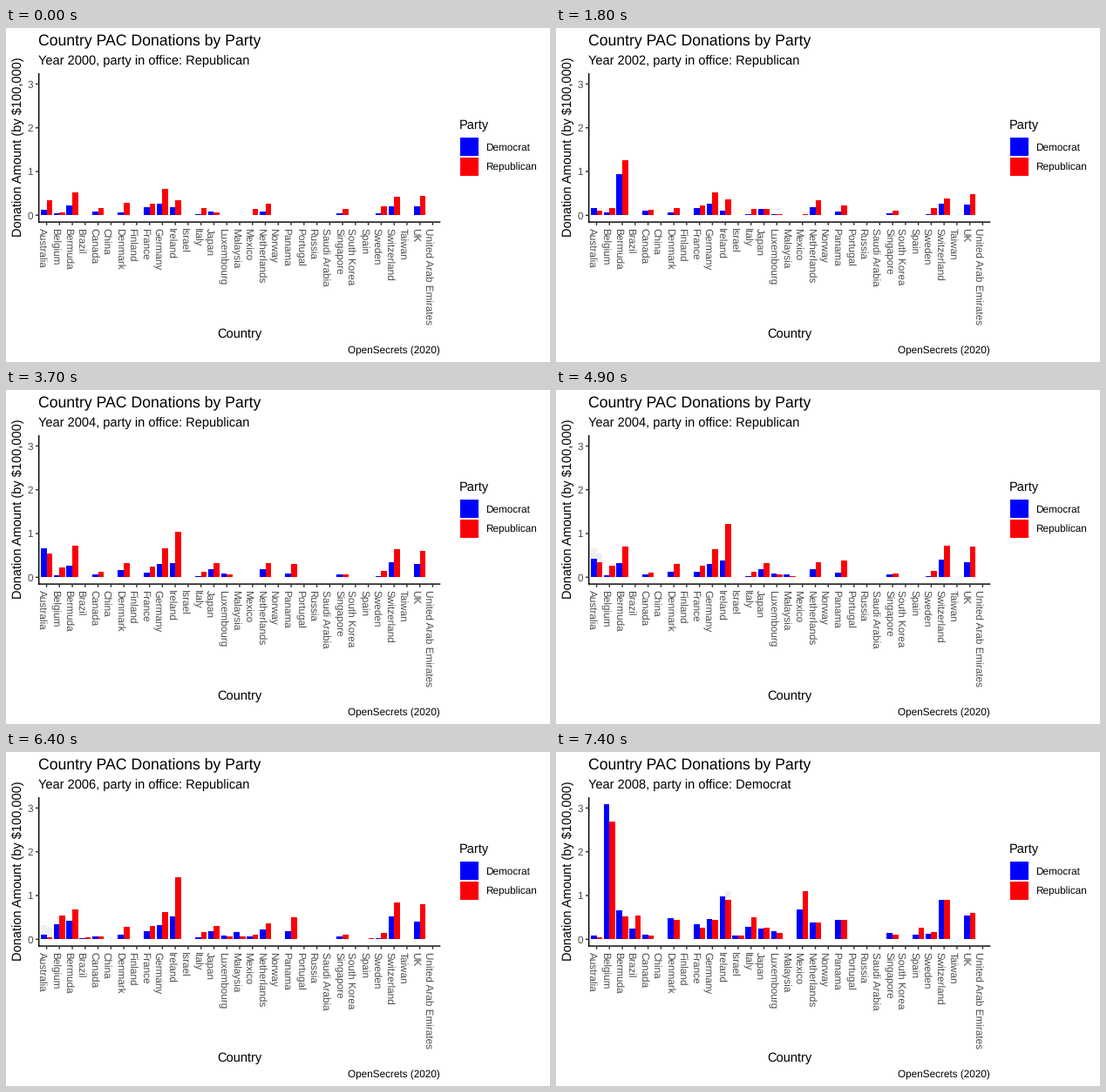
Animation, 624 px wide and 384 px high, one loop 8 s. Source, as a matplotlib script:

```python
import numpy as np
import matplotlib.pyplot as plt
from matplotlib.animation import FuncAnimation
from matplotlib.patches import Rectangle

plt.rcParams["font.family"] = "Liberation Sans"
plt.rcParams["text.hinting"] = "none"

WIDTH, HEIGHT, DPI = 624, 384, 96
LEFT, RIGHT, TOP, BOTTOM = 37.7, 498.3, 52.0, 223.1
ZERO, UNIT = 215.3, 50.3
STEP = (RIGHT - LEFT) / 31.2
BAR = 0.45 * STEP
BLUE, RED, WAKE = "#0000ff", "#fc0008", "#efefef"

COUNTRIES = (
    "Australia,Belgium,Bermuda,Brazil,Canada,China,Denmark,Finland,France,"
    "Germany,Ireland,Israel,Italy,Japan,Luxembourg,Malaysia,Mexico,Netherlands,"
    "Norway,Panama,Portugal,Russia,Saudi Arabia,Singapore,South Korea,Spain,"
    "Sweden,Switzerland,Taiwan,UK,United Arab Emirates").split(",")

# Donations for 2000, 2002, 2004, 2006 and 2008; countries left out gave nothing.
DEMOCRAT = {
    "Australia": (.13, .17, .66, .10, .08), "Belgium": (.05, .06, .05, .06, 3.09),
    "Bermuda": (.23, .94, .27, .39, .66), "Brazil": (0, 0, 0, 0, .24),
    "Canada": (.09, .11, .06, .07, .10), "Denmark": (.07, .07, .17, .07, .48),
    "France": (.18, .16, .11, .16, .34), "Germany": (.27, .27, .31, .30, .46),
    "Ireland": (.18, .11, .33, .48, .98), "Israel": (0, 0, 0, 0, .08),
    "Italy": (.02, .02, .02, .02, .28), "Japan": (.09, .15, .18, .18, .24),
    "Luxembourg": (0, .03, .09, .07, .19), "Malaysia": (0, 0, 0, .18, 0),
    "Mexico": (.01, 0, 0, 0, .68), "Netherlands": (.08, .18, .18, .20, .38),
    "Panama": (0, .08, .08, .15, .44), "Singapore": (.05, .05, .06, .06, .15),
    "Spain": (0, 0, 0, 0, .10), "Sweden": (.05, .02, .02, .02, .12),
    "Switzerland": (.20, .27, .35, .48, .90), "UK": (.20, .25, .31, .40, .54),
}
REPUBLICAN = {
    "Australia": (.35, .11, .55, .05, .05), "Belgium": (.07, .16, .23, .33, 2.69),
    "Bermuda": (.52, 1.26, .72, .69, .53), "Brazil": (0, 0, 0, 0, .54),
    "Canada": (.17, .13, .13, .07, .08), "Denmark": (.28, .17, .33, .27, .44),
    "France": (.27, .22, .25, .30, .27), "Germany": (.60, .53, .66, .63, .44),
    "Ireland": (.35, .37, 1.04, 1.46, .90), "Israel": (0, 0, 0, 0, .08),
    "Italy": (.16, .15, .13, .13, .50), "Japan": (.07, .15, .33, .30, .26),
    "Luxembourg": (0, .03, .06, .06, .14), "Malaysia": (0, 0, 0, .08, 0),
    "Mexico": (.15, .02, 0, 0, 1.10), "Netherlands": (.26, .35, .33, .37, .38),
    "Panama": (0, .22, .30, .50, .44), "Singapore": (.15, .10, .07, .10, .10),
    "Spain": (0, 0, 0, 0, .26), "Sweden": (.20, .17, .14, .15, .17),
    "Switzerland": (.43, .39, .65, .83, .90), "UK": (.44, .49, .60, .83, .60),
}
# values[year, party, country]
values = np.array([[[party.get(name, (0,) * 5)[year] for name in COUNTRIES]
                    for party in (DEMOCRAT, REPUBLICAN)] for year in range(5)])

STARTS, LENGTHS = (6, 25, 44, 63), (12, 12, 12, 11)
WAKE_STEP = 7

fig = plt.figure(figsize=(WIDTH / DPI, HEIGHT / DPI), dpi=DPI, facecolor="white")
ax = fig.add_axes([0, 0, 1, 1])
ax.set_xlim(0, WIDTH)
ax.set_ylim(HEIGHT, 0)
ax.axis("off")


def text(x, y, label, size=11, color="black", **kwargs):
    return ax.text(x, y, label, fontsize=size, color=color, va="baseline",
                   rotation_mode="anchor", **kwargs)


def line(xs, ys, color="black"):
    ax.plot(xs, ys, color=color, lw=1.07, solid_capstyle="butt", snap=False)


def box(x, y, width, height, color, zorder=1):
    """Rectangle with its edges on whole pixels."""
    return ax.add_patch(Rectangle((x, y), width, height, facecolor=color,
                                  linewidth=0, snap=True, zorder=zorder))


def bar_row(colors, zorder):
    return [[box(LEFT + (0.6 + i) * STEP + (party - 1) * BAR, ZERO, BAR, 0,
                 colors[party], zorder) for i in range(len(COUNTRIES))]
            for party in range(2)]


def set_heights(row, heights):
    for patches, party in zip(row, heights):
        for patch, value in zip(patches, party):
            patch.set_height(-UNIT * value)


def blend(k, step):
    t = step / LENGTHS[k]
    return values[k] * (1 - t) + values[k + 1] * t


def settled_wake(k):
    """Trace left standing once change k is over."""
    if k < 2:
        return np.zeros_like(values[0])
    trace = blend(k, WAKE_STEP)
    return np.where(trace - values[k + 1] > 0.15, trace, 0)


wakes = bar_row((WAKE, WAKE), 1)
bars = bar_row((BLUE, RED), 2)

# Axes
line([LEFT, LEFT], [TOP, BOTTOM + 0.7])
line([LEFT - 0.7, RIGHT], [BOTTOM, BOTTOM])
for tick in range(4):
    y = ZERO - UNIT * tick
    line([LEFT - 3.67, LEFT], [y, y], "#333333")
    text(31.1, y + 4.2, str(tick), 8.8, "#4d4d4d", ha="right")
for i, name in enumerate(COUNTRIES):
    x = LEFT + (0.6 + i) * STEP
    line([x, x], [BOTTOM, BOTTOM + 3.67], "#333333")
    text(x - 8.4, 229.7, name, 8.8, "#4d4d4d", ha="left", rotation=-90)

# Titles and caption
text(LEFT - 0.5, 19, "Country PAC Donations by Party", 13.2)
subtitle = text(LEFT - 0.5, 41.6, "")
text((LEFT + RIGHT) / 2 - 0.5, 355.4, "Country", ha="center")
text(17.8, (TOP + BOTTOM) / 2 - 1, r"Donation Amount (by \$100,000)", ha="center",
     rotation=90)
text(RIGHT - 0.5, 375, "OpenSecrets (2020)", 8.8, ha="right")

# Legend
text(519.7, 116, "Party")
for y, color, name in ((126, BLUE, "Democrat"), (149, RED, "Republican")):
    box(521, y, 21, 21, color)
    text(549.6, y + 14.8, name, 8.8)


def draw(frame):
    k = max([i for i, start in enumerate(STARTS) if frame >= start], default=0)
    step = min(max(frame - STARTS[k], 0), LENGTHS[k])
    set_heights(bars, blend(k, step))

    if step == LENGTHS[k]:
        wake = settled_wake(k)
    elif step >= WAKE_STEP:
        wake = blend(k, WAKE_STEP)
    else:
        wake = np.maximum(values[k], settled_wake(k - 1))
    set_heights(wakes, wake * (step > 0))

    year = 2000 + 2 * (k + (step / LENGTHS[k] > 0.5))
    party = "Democrat" if year == 2008 else "Republican"
    subtitle.set_text(f"Year {year}, party in office: {party}")
    return [subtitle]


anim = FuncAnimation(fig, draw, frames=80, interval=100, init_func=lambda: draw(0),
                     repeat=True, repeat_delay=0, blit=False)
plt.show()
```
